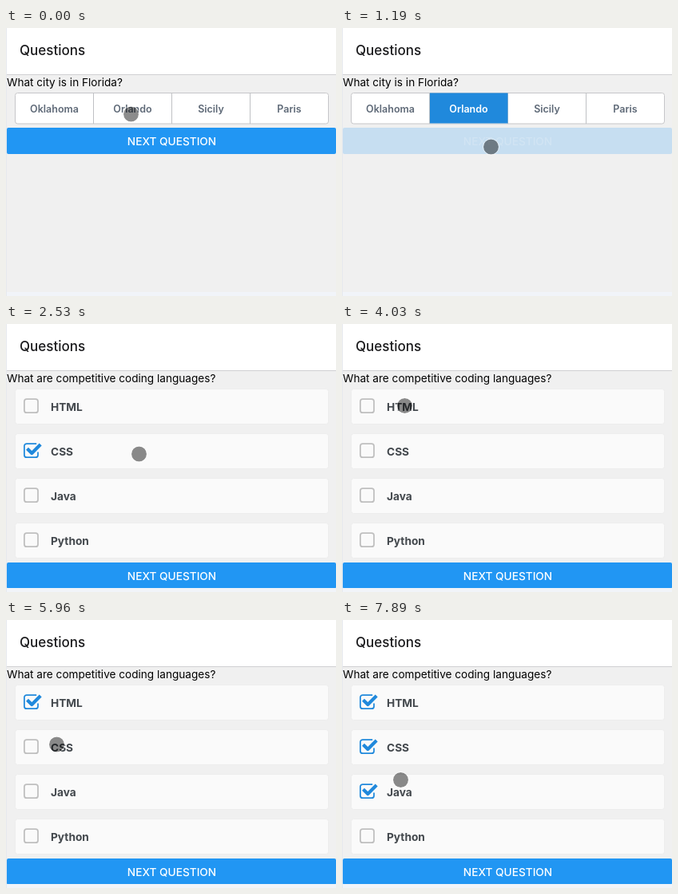
An HTML page with a canvas for the animation above (8000 ms loop, 413 px wide and 336 px high).

```html
<!DOCTYPE html>
<html lang="en">
<head>
<meta charset="utf-8">
<title>Questions</title>
<style>
  html, body { margin: 0; width: 100%; height: 100%; overflow: hidden; background: #f0f0f0; }
  canvas { display: block; width: 413px; height: 336px; }
</style>
</head>
<body>
<canvas id="stage"></canvas>
<script>
const W = 413, H = 336, LOOP = 8000;
const BLUE = '#2089dc';
const canvas = document.getElementById('stage');
const ctx = canvas.getContext('2d');
const dpr = window.devicePixelRatio || 1;
canvas.width = Math.round(W * dpr);
canvas.height = Math.round(H * dpr);

const cities = ['Oklahoma', 'Orlando', 'Sicily', 'Paris'];
const languages = ['HTML', 'CSS', 'Java', 'Python'];

// Pointer positions: [start ms, x, y]
const pointer = [
  [0, 156.5, 108], [740, 172, 129], [890, 186.5, 149],
  [2530, 166.5, 163], [2680, 140.5, 167.5],
  [3730, 120, 146], [3880, 95, 118], [4030, 78.5, 102.5],
  [5670, 75, 120], [5810, 68, 141], [5960, 63.5, 156],
  [6260, 64.5, 160], [6400, 65.5, 162.5],
  [7000, 68, 175], [7150, 71, 191], [7300, 73.5, 200.5]
];

// Row taps: [start ms, row, checked afterwards]
const taps = [[3430, 1, false], [5220, 0, true], [6700, 1, true], [7590, 2, true]];

// A tapped element dims, then recovers in two steps.
function tapAlpha(t, start) {
  if (t < start || t >= start + 300) return 1;
  return t < start + 150 ? 0.2 : 0.68;
}

function text(str, x, y, size, weight, color, align = 'left') {
  ctx.font = `${weight} ${size}px Inter, "Liberation Sans", sans-serif`;
  ctx.textAlign = align;
  ctx.fillStyle = color;
  ctx.fillText(str, x, y);
}

function rect(x, y, w, h, color) {
  ctx.fillStyle = color;
  ctx.fillRect(x, y, w, h);
}

function roundBox(x, y, w, h, r, fill, stroke, line = 1) {
  ctx.beginPath();
  ctx.roundRect(x, y, w, h, r);
  if (fill) { ctx.fillStyle = fill; ctx.fill(); }
  if (stroke) { ctx.strokeStyle = stroke; ctx.lineWidth = line; ctx.stroke(); }
}

function withAlpha(alpha, draw) {
  ctx.save();
  ctx.globalAlpha = alpha;
  draw();
  ctx.restore();
}

function nextButton(y, alpha) {
  withAlpha(alpha, () => {
    roundBox(1, y, 412, 33, 2, '#2196f3');
    text('NEXT QUESTION', 207.5, y + 22, 13.7, 500, '#fff', 'center');
  });
}

function cityGroup(t) {
  const left = 11.5, top = 81.5, cell = 98, h = 38.5;
  roundBox(left, top, cell * 4, h, 3, '#fff', '#c6c6c9');
  for (let i = 1; i < 4; i++) rect(left + cell * i - 0.5, top, 1, h, '#bfc1c4');
  const picked = t >= 300;
  if (picked) {
    withAlpha(t < 440 ? 0.68 : 1, () => rect(110, 81.5, 97.5, 38, BLUE));
  }
  cities.forEach((city, i) => {
    const color = picked && i === 1 ? '#fff' : '#5e6977';
    text(city, left + cell * (i + 0.5), 105.5, 12.5, 600, color, 'center');
  });
}

function checkbox(x, y, checked) {
  if (!checked) {
    roundBox(x + 0.9, y + 0.9, 17.1, 17.1, 3, null, '#bfbfbf', 1.75);
    return;
  }
  ctx.save();
  ctx.translate(x, y);
  ctx.strokeStyle = BLUE;
  ctx.lineWidth = 1.75;
  ctx.beginPath();
  ctx.moveTo(16.2, 1);
  ctx.arcTo(0.9, 0.9, 0.9, 18, 3);
  ctx.arcTo(0.9, 18, 18, 18, 3);
  ctx.arcTo(18, 18, 18, 10, 3);
  ctx.lineTo(18, 11.2);
  ctx.stroke();
  ctx.lineWidth = 4.2;
  ctx.lineJoin = 'round';
  ctx.beginPath();
  ctx.moveTo(4.5, 7.1);
  ctx.lineTo(10.3, 12.9);
  ctx.lineTo(21.2, 1.9);
  ctx.stroke();
  ctx.restore();
}

function languageRows(t) {
  const ready = t >= 1490;
  const pitch = ready ? 56 : 48.4;
  const h = ready ? 44 : 36.5;
  languages.forEach((name, i) => {
    const y = 81.5 + pitch * i;
    let checked = i === 1, alpha = 1;
    for (const [start, row, after] of taps) {
      if (row !== i) continue;
      if (t >= start + 150) checked = after;
      alpha *= tapAlpha(t, start);
    }
    withAlpha(alpha, () => {
      roundBox(11.5, y, 392, h, 3, '#fafafa', '#ededed');
      if (ready) checkbox(22, y + 11.7, checked);
      text(name, ready ? 56 : 32, y + (ready ? 27.5 : 23.6), 13.7, 700, '#43484d');
    });
  });
}

function drawPointer(t) {
  const [, x, y] = pointer.findLast(p => p[0] <= t);
  ctx.beginPath();
  ctx.arc(x, y, 9.5, 0, Math.PI * 2);
  ctx.fillStyle = 'rgba(0,0,0,.45)';
  ctx.fill();
  ctx.beginPath();
  ctx.arc(x, y, 10, 0, Math.PI * 2);
  ctx.strokeStyle = 'rgba(255,255,255,.5)';
  ctx.lineWidth = 1;
  ctx.stroke();
}

function draw(t) {
  ctx.setTransform(dpr, 0, 0, dpr, 0, 0);
  rect(0, 0, W, H, '#f0f0f0');
  rect(0, 0, W, 58, '#fff');
  rect(0, 58, W, 1, '#d0d0d2');
  text('Questions', 17, 34, 17, 500, '#1c1c1e');

  const second = t >= 1340;
  text(second ? 'What are competitive coding languages?' : 'What city is in Florida?',
    1, 72.5, 13.6, 400, '#000');
  if (second) languageRows(t);
  else cityGroup(t);
  nextButton(!second ? 125 : t < 1490 ? 269 : 299, tapAlpha(t, 1190));

  rect(0, 331, W, 5, '#f1f4f9');
  rect(0, 0, 1, H, '#e6e9ee');
  drawPointer(t);
}

function frame() {
  draw(performance.now() % LOOP);
  requestAnimationFrame(frame);
}
frame();
</script>
</body>
</html>
```
